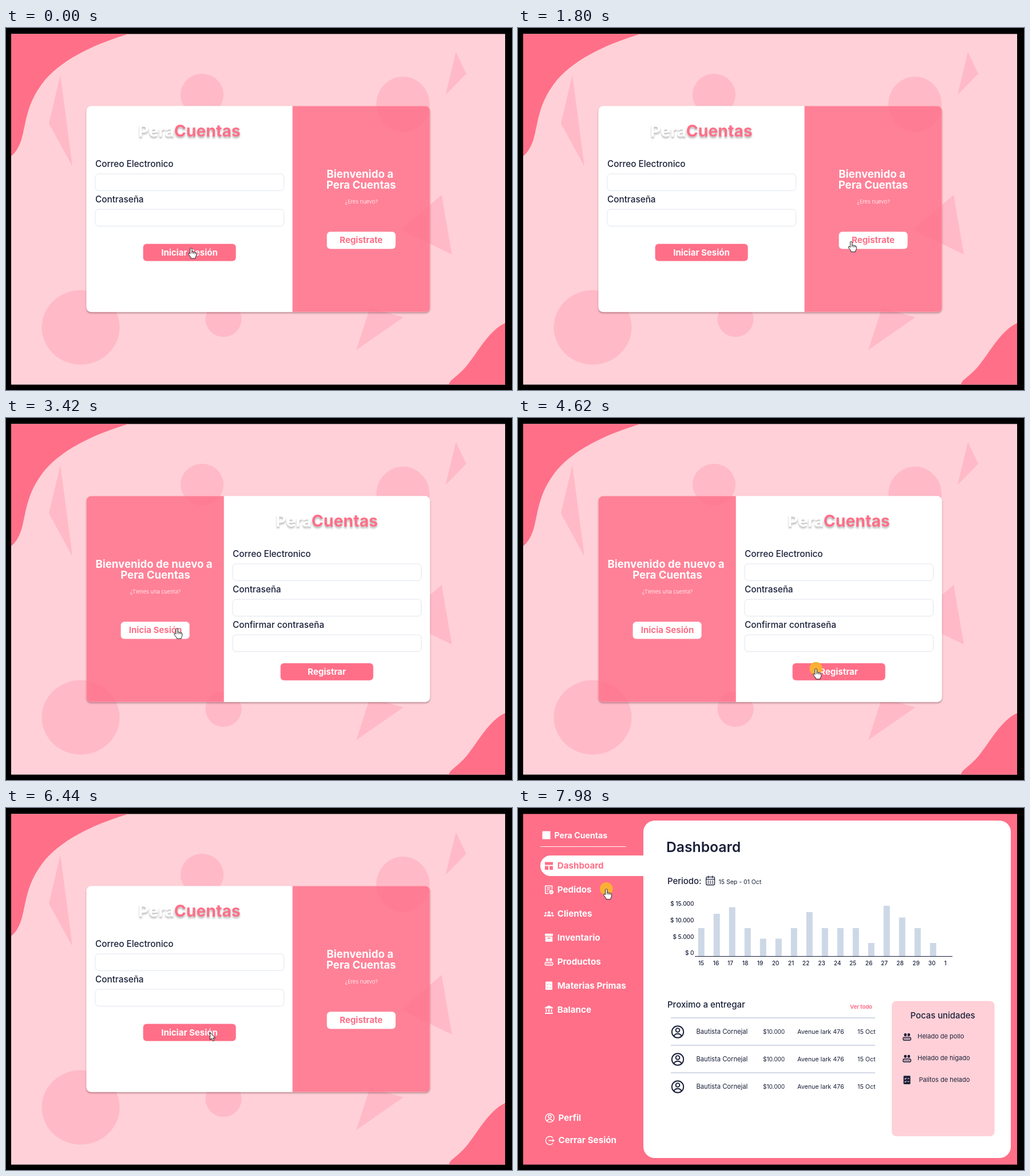
Animation of 884x633 px, one loop 8000 ms. Source, as an HTML page:

```html
<!DOCTYPE html>
<html lang="es">
<head>
<meta charset="utf-8">
<title>Pera Cuentas</title>
<style>
html, body { margin: 0; width: 100%; height: 100%; overflow: hidden; background: #000; }
svg { display: block; }
text { font-family: Inter, "Open Sans", sans-serif; fill: #1a2039; white-space: pre; }
.pink { fill: #ff6f88; }
.white { fill: #fff; }
.soft { fill: #ffb9c7; }
.mid { text-anchor: middle; }
.label { font-size: 15.3px; font-weight: 500; }
.btn { font-size: 15px; font-weight: 700; text-anchor: middle; }
.hello { font-size: 18.6px; font-weight: 700; text-anchor: middle; fill: #fff; }
.ask { font-size: 9.3px; font-weight: 300; text-anchor: middle; fill: #fff; }
.brand { font-size: 28.3px; font-weight: 700; text-anchor: middle; filter: drop-shadow(0 3px 1.5px rgba(0,0,0,.27)); }
.field { fill: #fff; stroke: #e0e5ee; }
.menu { font-size: 15.2px; font-weight: 700; }
.tick { font-size: 10px; font-weight: 500; }
.cell { font-size: 10.7px; }
text.pink { fill: #ff6f88; }
text.white { fill: #fff; }
#shadow { filter: drop-shadow(0 2px 1.5px rgba(60,20,30,.4)); }
</style>
</head>
<body>
<svg width="884" height="633">
  <defs>
    <clipPath id="outside">
      <path clip-rule="evenodd" d="M0 0H884V633H0ZM148.6 136.6h584a8 8 0 0 1 8 8v344a8 8 0 0 1-8 8h-584a8 8 0 0 1-8-8v-344a8 8 0 0 1 8-8Z"/>
    </clipPath>
    <g id="fields">
      <text class="brand" x="320.5" y="190"><tspan fill="#fff">Pera</tspan><tspan fill="#ff6f88">Cuentas</tspan></text>
      <text class="label" x="156" y="243">Correo Electronico</text>
      <rect class="field" x="156" y="255" width="329.5" height="29.5" rx="6"/>
      <text class="label" x="156" y="305">Contraseña</text>
      <rect class="field" x="156" y="317" width="329.5" height="29.5" rx="6"/>
    </g>
    <rect id="wide" width="162" height="30" rx="6"/>
    <rect id="short" width="120" height="30" rx="6"/>
    <g id="grid" fill="currentColor"><path d="M-7-6.5h14v5h-14zM-7 .5h6v6.5h-6zM1 .5h6v6.5h-6z"/></g>
    <g id="order" fill="none" stroke="currentColor" stroke-width="1.6">
      <path d="M-.5 6.5H-6.2V-6.7H5.5V-.5M-3.5-3.5h6M-3.5-.5h5M-3.5 2.5h2"/>
      <circle cx="4.2" cy="4" r="3.7" fill="currentColor" stroke="none"/>
      <path d="M2.4 4L3.7 5.3L6 2.8" stroke="#ff6f88" stroke-width="1"/>
    </g>
    <g id="people" fill="currentColor">
      <circle cy="-2.2" r="2.3"/><circle cx="-5.6" cy="-1.2" r="1.7"/><circle cx="5.6" cy="-1.2" r="1.7"/>
      <path d="M-4 4.5V3Q-3.5 1 0 1T4 3V4.5ZM-8.5 4.5V3Q-8 1.4-5 1.4Q-5.2 2.4-5.2 4.5ZM8.5 4.5V3Q8 1.4 5 1.4Q5.2 2.4 5.2 4.5Z"/>
    </g>
    <g id="box" fill="currentColor"><path fill-rule="evenodd" d="M-7-7h14v4h-14zM-6.3-2h12.6v9h-12.6zM-2.5 0v1.7h5v-1.7z"/></g>
    <g id="goods" fill="none" stroke="currentColor" stroke-width="1.5">
      <rect x="-6.8" y="1" width="13.6" height="5.2" rx="2.6"/>
      <g fill="currentColor" stroke="none">
        <rect x="-5" y="-6" width="4.4" height="5" rx="1.5"/><rect x="1" y="-6" width="4.4" height="5" rx="1.5"/>
        <circle cx="-3.3" cy="3.6" r="1"/><circle cy="3.6" r="1"/><circle cx="3.3" cy="3.6" r="1"/>
      </g>
    </g>
    <g id="list">
      <rect x="-6" y="-7.3" width="12" height="14.6" rx="1.3" fill="currentColor"/>
      <path d="M-4-2.6l1.2 1.2L-.8-3.6M-4 2.6l1.2 1.2L-.8 1.6M1-2.4H4M1 2.8H4" fill="none" stroke="#ffc0ca" stroke-width="1.2"/>
    </g>
    <g id="bank" fill="currentColor"><path d="M0-7.5L7-4V-2.3H-7V-4ZM-5.5-1h2v5h-2zM-1-1h2v5h-2zM3.5-1h2v5h-2zM-7 5.2h14v2h-14z"/></g>
    <g id="user" fill="none" stroke="currentColor" stroke-width="1.9">
      <circle r="10.2"/><circle cy="-3" r="3.4"/><path d="M-6.7 7.3Q-5 3.2 0 3.2T6.7 7.3"/>
    </g>
    <g id="exit" fill="none" stroke="currentColor" stroke-width="1.4">
      <path d="M5.6-4.6A7.2 7.2 0 1 0 5.6 4.6M-2 0H7.4M4.8-2.5L7.4 0L4.8 2.5"/>
    </g>
  </defs>

  <g id="scene">
    <rect x="9" y="10.4" width="863" height="613.2" fill="#ffd0d7"/>
    <path class="pink" d="M9 10.4H214C164 25 102 51 68 91C35 132 36 163 27 195Q20 216 9 224Z"/>
    <path class="pink" d="M872 516C845 528 826 564 807 588C795 603 786 609 778 616Q774 620 774 623.6H872Z"/>
    <g class="soft">
      <ellipse cx="342.5" cy="116.5" rx="37.5" ry="36.5"/>
      <ellipse cx="693.5" cy="133.5" rx="46.5" ry="48.5"/>
      <ellipse cx="130.5" cy="523.5" rx="68" ry="65"/>
      <ellipse cx="380" cy="509" rx="31.5" ry="31"/>
      <path d="M95 82L75 167L116 242ZM786 42L804 80L768 117ZM761 292L779 396L690 353ZM636 489L694 506L612 563Z"/>
    </g>
    <g clip-path="url(#outside)"><rect id="shadow" class="white" x="140.6" y="136.6" width="600" height="360" rx="8"/></g>
    <g id="card">
      <path class="white" d="M500.6 136.6v360h-352a8 8 0 0 1-8-8v-344a8 8 0 0 1 8-8Z"/>
      <path class="pink" opacity=".8" d="M500.6 136.6v360h232a8 8 0 0 0 8-8v-344a8 8 0 0 0-8-8Z"/>
    </g>
  </g>

  <g id="login">
    <use href="#fields"/>
    <use href="#wide" class="pink" x="239.6" y="377.6"/>
    <text class="btn white" x="320.5" y="397.5">Iniciar Sesión</text>
    <text class="hello" x="618.5" y="262">Bienvenido a</text>
    <text class="hello" x="620.5" y="280.5">Pera Cuentas</text>
    <text class="ask" x="621" y="307">¿Eres nuevo?</text>
    <use href="#short" class="white" x="560.6" y="356.2"/>
    <text class="btn pink" x="620.5" y="375.5">Registrate</text>
  </g>

  <g id="register">
    <use href="#fields" x="240"/>
    <text class="label" x="396" y="367">Confirmar contraseña</text>
    <rect class="field" x="396" y="379" width="329.5" height="29.5" rx="6"/>
    <use href="#wide" class="pink" x="479.6" y="428.8"/>
    <text class="btn white" x="560.5" y="448.5">Registrar</text>
    <text class="hello" x="258.5" y="262">Bienvenido de nuevo a</text>
    <text class="hello" x="261" y="280.5">Pera Cuentas</text>
    <text class="ask" x="261" y="307">¿Tienes una cuenta?</text>
    <use href="#short" class="white" x="200.6" y="356.2"/>
    <text class="btn pink" x="261" y="375.5">Inicia Sesión</text>
  </g>

  <g id="dash">
    <rect class="pink" x="9" y="10.4" width="863" height="613.2"/>
    <rect class="white" x="219" y="22" width="642" height="590" rx="20"/>
    <rect class="white" x="42.5" y="40.5" width="14" height="14"/>
    <text class="white" x="63.5" y="53" font-size="14.2" font-weight="700">Pera Cuentas</text>
    <path d="M39 67.5H189" stroke="#fff"/>
    <path class="white" d="M220 83H57a18 18 0 0 0 0 36H220Z"/>
    <g id="nav"></g>
    <text x="259" y="77" font-size="24.7" font-weight="600">Dashboard</text>
    <text x="261" y="132.5" font-size="14.9" font-weight="500">Periodo:</text>
    <g fill="none" stroke="#1a2039" stroke-width="1.3">
      <rect x="328.7" y="120.7" width="14.8" height="13.8" rx="2"/>
      <path d="M328.7 124.7H343.5M332.5 118.5V122.5M339.7 118.5V122.5"/>
      <path d="M331.5 128H341.5M331.5 131.2H341.5" stroke-width="1.7" stroke-dasharray="2 1.8"/>
    </g>
    <text x="350.5" y="133" font-size="10.5">15 Sep - 01 Oct</text>
    <g id="chart"></g>
    <path d="M309 259.5H759" stroke="#1a2039"/>
    <text x="261" y="348.5" font-size="15" font-weight="500">Proximo a entregar</text>
    <text class="pink" x="580" y="350.5" font-size="9.4" font-weight="700">Ver todo</text>
    <g id="rows"></g>
    <rect x="653" y="337.5" width="179.5" height="236.5" rx="8" fill="#ffd0d7"/>
    <text class="mid" x="742" y="367.5" font-size="14.9" font-weight="500">Pocas unidades</text>
    <g id="stock"></g>
  </g>

  <circle id="click" r="11.3" fill="#fbb034"/>
  <g id="cursor" fill="#fff" stroke="#222" stroke-linejoin="round">
    <path id="hand" d="M-1.6 1.2Q0-.6 1.6 1.2V7Q3 5.8 4.3 7.4Q5.8 6.4 7 8Q8.8 7.4 9.3 9.3V12.5Q9 15 7.6 16.5V18.4H-.2V17L-4.6 11Q-5.3 8.6-3 9L-1.6 10.6ZM1.6 7V10M4.4 7.6V10.4M7 8.2V10.6"/>
    <path id="arrow" d="M0 0V13L3 10.2L5 15L7.2 14.1L5.2 9.6H9.2Z"/>
  </g>
</svg>

<script>
const $ = id => document.getElementById(id);
const fill = (id, parts) => { $(id).innerHTML = parts.join(''); };
const icon = (name, x, y, color, scale = 1) =>
  `<g transform="translate(${x} ${y}) scale(${scale})" color="${color}"><use href="#${name}"/></g>`;
const text = (cls, x, y, s, attrs = '') => `<text class="${cls}" x="${x}" y="${y}" ${attrs}>${s}</text>`;
const DARK = '#1a2039', PINK = '#ff6f88';

const menu = [['grid', 'Dashboard'], ['order', 'Pedidos'], ['people', 'Clientes'], ['box', 'Inventario'],
  ['goods', 'Productos'], ['list', 'Materias Primas'], ['bank', 'Balance']];
fill('nav', [
  ...menu.map(([name, label], i) => {
    const y = 101 + 41.95 * i;
    return icon(name, 54, y, i ? '#fff' : PINK) + text(i ? 'menu white' : 'menu pink', 68.7, y + 5.3, label);
  }),
  icon('user', 55.5, 542, '#fff', .74), text('menu white', 70.5, 546.8, 'Perfil'),
  icon('exit', 55.5, 581.5, '#fff'), text('menu white', 70.5, 585.8, 'Cerrar Sesión')
]);

const tops = [210, 185, 173.5, 210, 228.5, 228.5, 210, 182, 210, 210, 210, 236, 171, 191.5, 210, 236];
const days = [320, 346, 371, 397, 423, 450, 477, 503, 530.5, 558, 585, 613, 640, 667.5, 695.5, 723, 746.5];
fill('chart', [
  ...tops.map((y, i) => `<rect x="${314.7 + 27 * i}" y="${y}" width="11" height="${259 - y}" fill="#cdd8e6"/>`),
  ...days.map((x, i) => text('tick mid', x, 275.3, i < 16 ? 15 + i : 1)),
  ...['$ 15.000', '$ 10.000', '$ 5.000', '$ 0'].map((s, i) =>
    text('tick', 307.5, 171 + 28.8 * i, s, 'text-anchor="end"'))
]);

fill('rows', [0, 48, 96].map(d =>
  `<path d="M267 ${367 + d}H624" stroke="#c5cddf" stroke-width="1.3"/>` +
  icon('user', 279, 391.5 + d, DARK) +
  text('cell', 311.5, 395 + d, 'Bautista Cornejal', 'style="font-size:11.2px"') +
  text('cell', 428, 395 + d, '$10.000', 'style="font-size:10px"') +
  text('cell', 488, 395 + d, 'Avenue lark 476') +
  text('cell', 624.5, 395 + d, '15 Oct', 'text-anchor="end"')));

fill('stock', [['goods', 698, 'Helado de pollo'], ['goods', 698, 'Helado de higado'], ['list', 700.5, 'Palitos de helado']]
  .map(([name, x, s], i) => icon(name, 679.5, 400 + 37.8 * i, DARK) +
    text('cell', x, 403.3 + 37.8 * i, s, 'style="font-size:11px"')));

// Pointer trips: start, end, steps, target x and y, bend x and y
const trips = [
  [500, 1050, 9, 561, 374],
  [1260, 1400, 3, 582, 373],
  [2510, 3160, 11, 298.5, 367.5, 440, 346],
  [3920, 4340, 7, 520.5, 438],
  [5210, 5690, 8, 356.5, 392.5, 400, 315],
  [7300, 7710, 7, 154.3, 141.3]
];
const clicks = [[1600, 1800], [4620, 4880], [6150, 6370], [7980, 8000]];
// Hot areas per view: left, top, right, bottom
const hot = {
  login: [[240, 378, 402, 408], [560, 356, 681, 387]],
  register: [[201, 356, 321, 387], [480, 429, 642, 459]],
  dash: [[39, 83, 190, 372]]
};
const within = (t, a, b) => t >= a && t < b;
const show = (id, on) => { $(id).style.display = on ? '' : 'none'; };

function pointer(t) {
  let x = 323.3, y = 384.5;
  for (const [start, end, n, tx, ty, bx = (x + tx) / 2, by = (y + ty) / 2] of trips) {
    if (t < start) break;
    const k = Math.min(n, Math.floor((t - start) / (end - start) * (n - 1) + 1e-6) + 1);
    const p = k / n, e = p * p * (3 - 2 * p), q = 1 - e;
    x = q * q * x + 2 * q * e * bx + e * e * tx;
    y = q * q * y + 2 * q * e * by + e * e * ty;
  }
  return [x, y];
}

function draw(now) {
  const t = now % 8000;
  const view = t >= 6510 ? 'dash' : within(t, 1860, 4880) ? 'register' : 'login';
  for (const id in hot) show(id, id === view);
  show('scene', view !== 'dash');
  $('card').setAttribute('transform', view === 'register' ? 'translate(881.2) scale(-1 1)' : '');

  const [x, y] = pointer(t), at = `translate(${x} ${y})`;
  const late = within(t, 2510, 3310) || within(t, 6440, 6510);
  const hand = !late && hot[view].some(([l, u, r, d]) => x >= l && x <= r && y >= u && y <= d);
  $('cursor').setAttribute('transform', at);
  $('click').setAttribute('transform', at);
  show('hand', hand);
  show('arrow', !hand);
  show('click', clicks.some(([a, b]) => within(t, a, b)));
}

const begin = performance.now();
function tick() {
  draw(performance.now() - begin);
  requestAnimationFrame(tick);
}
tick();
</script>
</body>
</html>
```
